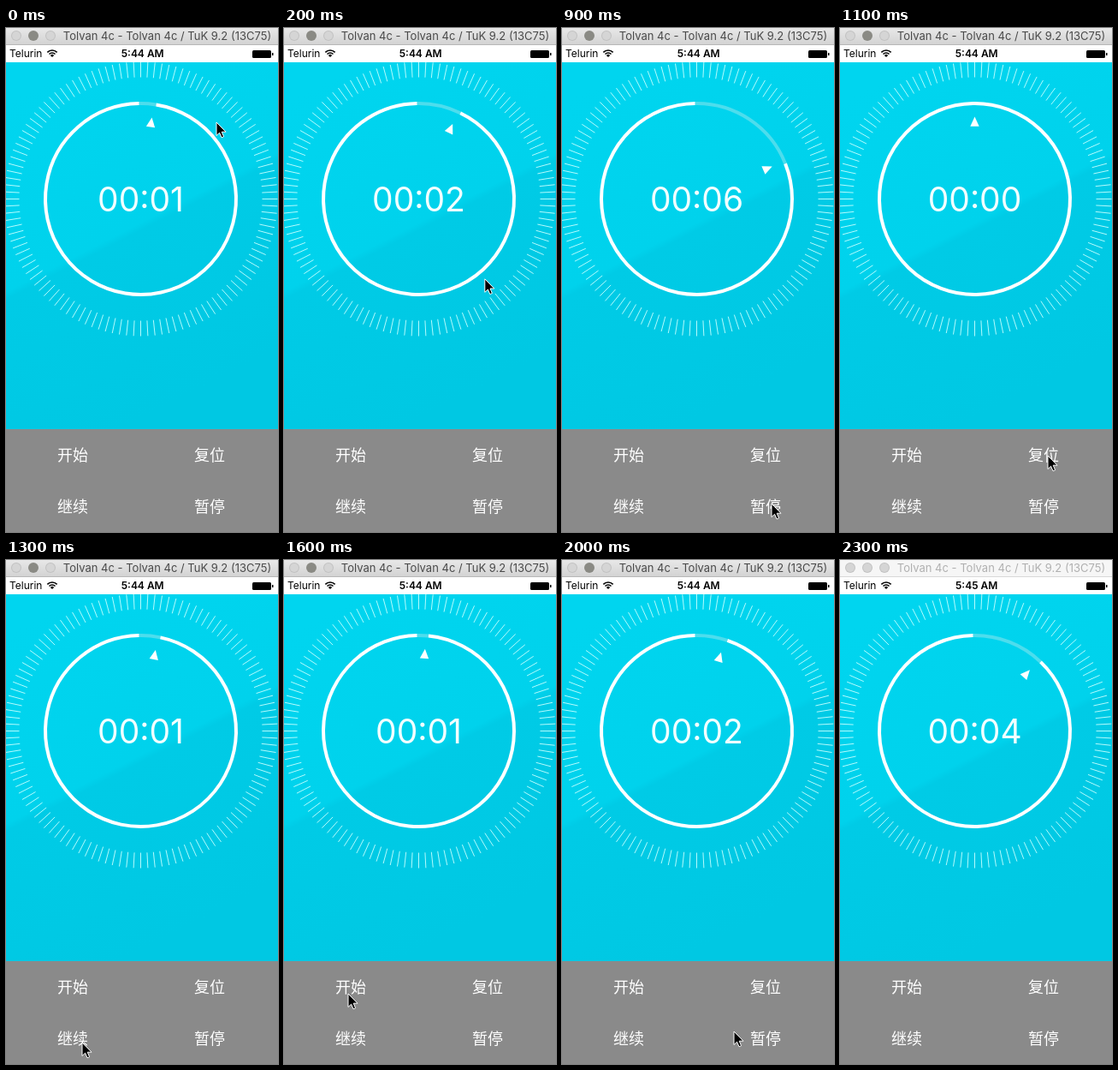
Write an HTML page with a canvas that moves like this. It is 318 px wide and 588 px high and loops after 2400 ms.

```html
<!DOCTYPE html>
<html lang="zh">
<head>
<meta charset="utf-8">
<title>Stopwatch</title>
<style>
html, body { margin: 0; width: 100%; height: 100%; overflow: hidden; }
body { position: relative; width: 318px; height: 588px; background: #00c9e4; }
canvas, svg { position: absolute; left: 0; top: 0; width: 318px; height: 588px; }
text { font-family: Inter, "Liberation Sans", sans-serif; }
.mid text, text.mid { text-anchor: middle; }
.buttons text { font: 18px "Noto Sans CJK SC", "Noto Sans CJK", sans-serif; fill: #fff; }
</style>
</head>
<body>
<canvas id="stage" width="318" height="588"></canvas>
<svg viewBox="0 0 318 588">
  <text id="title" class="mid" x="188.5" y="14" font-size="13">Tolvan 4c - Tolvan 4c / TuK 9.2 (13C75)</text>
  <text x="4" y="34.3" font-size="12">Telurin</text>
  <text id="clock" class="mid" x="159.7" y="34.3" font-size="12" font-weight="600"></text>
  <text id="count" class="mid" x="157.5" y="214" font-size="39" font-weight="400" fill="#f2ffff"></text>
  <g class="buttons mid">
    <text x="78" y="504.5">开始</text>
    <text x="238" y="504.5">复位</text>
    <text x="78" y="564.5">继续</text>
    <text x="238" y="564.5">暂停</text>
  </g>
  <path id="cursor" d="M0 0V15.5L3.6 12.2L6 17.8L8.6 16.7L6.2 11.2H11Z" fill="#000" stroke="#fff" stroke-width="1" stroke-linejoin="round"/>
</svg>
<script>
const LOOP = 2400, STEP = 100, CX = 157.5, CY = 199.5, SPEED = 0.083;
const $ = id => document.getElementById(id);
const ctx = $("stage").getContext("2d");
const rad = deg => (deg - 90) * Math.PI / 180;

// The stopwatch runs three times; pauses halt it, a new run starts at zero.
const runs = [[-94, 1040], [1175, 1450], [1547, LOOP]];
const pauses = [[710, 1040], [1700, 1945]];

const spot = {
  dial: [246, 110], below: [218, 567], out: [537, 511],
  start: [75, 506], reset: [243, 499], resume: [89, 563], pause: [245, 555]
};
const visits = [
  [0, "dial"], [500, "below"], [700, "pause"], [900, "pause"], [1100, "reset"],
  [1200, "start"], [1300, "resume"], [1500, "reset"], [1600, "start"],
  [1800, "pause"], [1900, "resume"], [2300, "out"]
];

function dialAngle(t) {
  const run = runs.find(([from, to]) => t >= from && t < to);
  if (!run) return 0;
  let ms = t - run[0];
  for (const [from, to] of pauses)
    if (from >= run[0] && t > from) ms -= Math.min(t, to) - from;
  return ms * SPEED;
}

function pointerAt(t) {
  const i = Math.max(1, visits.findIndex(v => v[0] >= t));
  const [t0, from] = visits[i - 1], [t1, to] = visits[i];
  const k = (t - t0) / (t1 - t0);
  return spot[from].map((v, n) => v + (spot[to][n] - v) * k);
}

function box(x, y, w, h, fill) {
  ctx.fillStyle = fill;
  ctx.fillRect(x, y, w, h);
}

function disc(x, y, r, fill) {
  ctx.beginPath();
  ctx.arc(x, y, r, 0, Math.PI * 2);
  ctx.fillStyle = fill;
  ctx.fill();
}

function arc(x, y, r, from, to, width, stroke) {
  ctx.beginPath();
  ctx.arc(x, y, r, rad(from), rad(to));
  ctx.lineWidth = width;
  ctx.strokeStyle = stroke;
  ctx.stroke();
}

function polar(r, deg) {
  return [CX + r * Math.cos(rad(deg)), CY + r * Math.sin(rad(deg))];
}

function titleBar(active) {
  const g = ctx.createLinearGradient(0, 0, 0, 20);
  g.addColorStop(0, active ? "#e8e8e8" : "#f6f6f6");
  g.addColorStop(1, active ? "#d2d2d2" : "#f6f6f6");
  box(0, 0, 318, 20, g);
  box(0, 19, 318, 1, active ? "#b8b8b8" : "#d8d8d8");
  for (const x of [12, 32, 52]) {
    const dark = active && x === 32;
    disc(x, 9, 6, dark ? "#8a8a84" : "#c2c2c2");
    if (!dark) disc(x, 9, 5, "#d5d5d5");
  }
}

function statusBar() {
  box(0, 20, 318, 20, "#fff");
  for (const r of [1.5, 5, 8]) arc(54, 34, r, -45, 45, r < 2 ? 3 : 1.6, "#000");
  ctx.beginPath();
  ctx.roundRect(288, 26, 22, 9, 1.5);
  ctx.fillStyle = "#000";
  ctx.fill();
  box(311, 29, 1.5, 3, "#000");
}

function face(deg) {
  const g = ctx.createLinearGradient(68, 53, 250, 409);
  g.addColorStop(0, "#00d5ef");
  g.addColorStop(0.49, "#00d2ec");
  g.addColorStop(0.51, "#00cbe6");
  g.addColorStop(1, "#00c8e3");
  box(0, 40, 318, 428, g);

  ctx.beginPath();
  for (let a = 0; a < 360; a += 3) {
    ctx.moveTo(...polar(142, a));
    ctx.lineTo(...polar(160, a));
  }
  ctx.lineWidth = 1;
  ctx.strokeStyle = "rgba(200,255,255,.9)";
  ctx.stroke();

  const end = deg > 0 ? deg + 1.5 : -1;
  arc(CX, CY, 111.5, -1, end, 4, "#4ddded");
  arc(CX, CY, 111.5, end, 359, 4, "#fff");

  ctx.beginPath();
  ctx.moveTo(...polar(96, deg));
  ctx.lineTo(...polar(85, deg + 3.5));
  ctx.lineTo(...polar(85, deg - 3.5));
  ctx.fillStyle = "#fff";
  ctx.fill();
}

function draw(now) {
  const t = Math.floor(now % LOOP / STEP) * STEP;
  const deg = dialAngle(t), active = t < 2300;
  face(deg);
  titleBar(active);
  statusBar();
  box(0, 468, 318, 120, "#8a8a8a");

  const secs = deg > 0 ? Math.round(deg / 10.5 + 0.1) : 0;
  $("count").textContent = "00:" + String(secs).padStart(2, "0");
  $("clock").textContent = t < 2100 ? "5:44 AM" : "5:45 AM";
  $("title").setAttribute("fill", active ? "#4a4a4a" : "#b0b0b0");
  $("cursor").setAttribute("transform", `translate(${pointerAt(t)})`);
}

const start = performance.now();
function loop() {
  draw(performance.now() - start);
  requestAnimationFrame(loop);
}
loop();
</script>
</body>
</html>
```
